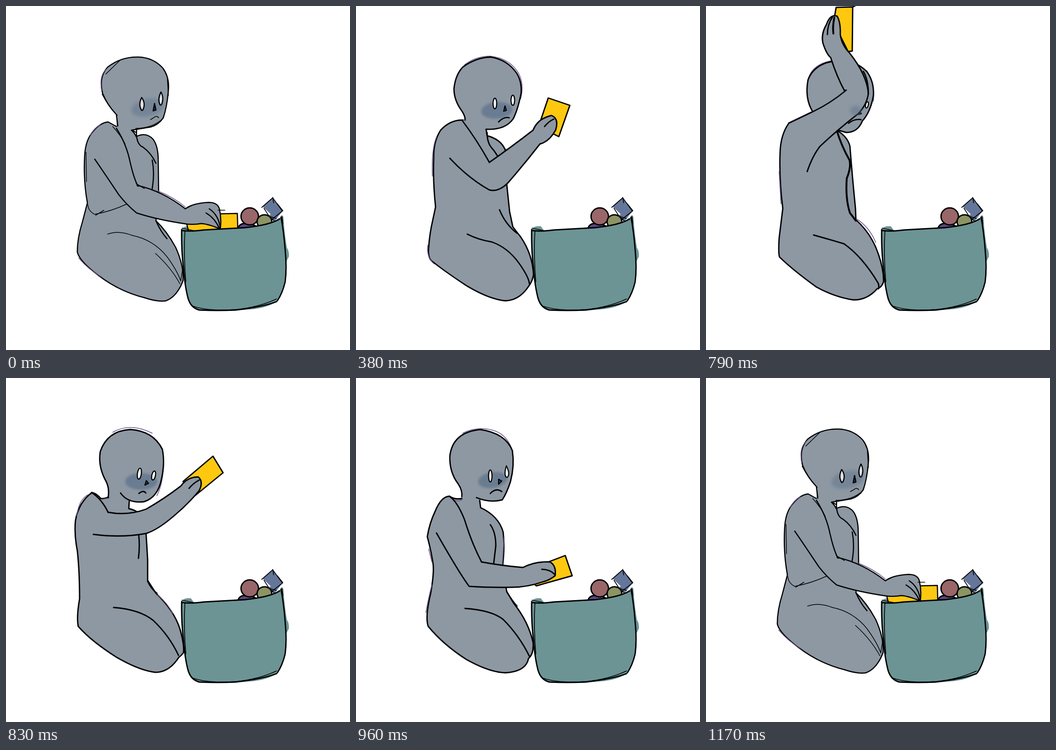
Animation of 748 by 748 pixels, one loop 1540 ms. Source, as an HTML page without scripts:

```html
<!DOCTYPE html>
<html lang="en">
<head>
<meta charset="utf-8">
<title>Toy basket</title>
<style>
html, body { margin: 0; width: 100%; height: 100%; overflow: hidden; background: #fff; }
svg { display: block; width: 100vw; height: 100vh; overflow: hidden; }
path, ellipse { stroke: #000; stroke-width: 2.9; stroke-linecap: round; stroke-linejoin: round; }
.skin, .neck { fill: #8d98a3; }
.neck { stroke: none; }
.line { fill: none; }
.thin { fill: none; stroke-width: 1.7; }
.thick { fill: none; stroke-width: 4; }
.under { fill: none; stroke: #6b5687; stroke-width: 1.6; }
.card { fill: #fec810; }
.eye { fill: #f4f6f7; stroke-width: 2.4; }
.nose { fill: #34404e; stroke-width: 2.2; }
.blush { fill: #5f738b; stroke: none; opacity: .75; filter: blur(2.5px); }
.faint { opacity: .5; filter: blur(3.5px); }
.rough path { stroke-width: 2.5; }
.rough .thin, .rough .under { stroke-width: 1.5; }
.rough .neck { stroke: none; }
.rough .eye { fill: #dde1e5; }
.teal { fill: #6c9495; stroke: none; }
#reel { animation: reel 1540ms step-end infinite; }
/* one cell of the reel per drawing, 1000 units apart */
@keyframes reel {
  0% { transform: translateX(0); }
  18.83% { transform: translateX(-1000px); }
  24.67% { transform: translateX(-2000px); }
  29.87% { transform: translateX(-3000px); }
  35.06% { transform: translateX(-4000px); }
  51.29% { transform: translateX(-5000px); }
  53.89% { transform: translateX(-6000px); }
  57.14% { transform: translateX(-7000px); }
  62.33% { transform: translateX(-8000px); }
  67.53% { transform: translateX(-9000px); }
  70.12% { transform: translateX(-10000px); }
  75.97%, 100% { transform: translateX(0); }
}
</style>
</head>
<body>
<svg viewBox="0 0 748 748">
<defs>
  <g id="rest" class="rough">
    <path class="neck" d="M241 245L276 260L273 271L282 284L240 264Z"/>
    <path class="skin" d="M273 270Q281 278 283 284Q305 273 320 290Q331 305 331 335L332 408L326 467Q350 490 369 525Q387 565 385 597Q372 632 348 641Q330 644 300 634Q245 620 200 585Q160 555 155 535Q155 505 166 470L177 428Q168 380 171 325Q173 290 190 272Q205 254 222 252L240 262"/>
    <path class="skin" d="M243 261L240 236Q220 215 210 190Q201 155 221 133Q250 110 288 111Q320 112 341 135Q356 155 353 185Q350 220 342 243Q332 258 315 263L273 270"/>
    <path class="line" d="M284 270Q282 300 298 307Q316 320 326 342M318 335Q324 365 317 402M326 467Q336 490 350 506M274 270L283 275"/>
    <path class="thin" d="M221 496Q245 487 275 499Q320 508 350 545Q372 575 380 598M178 432Q179 446 193 453Q230 446 264 430M195 455L213 444M325 538Q360 570 378 604M217 148L247 119M209 192Q223 219 242 238M282 266Q318 266 341 245M380 597L386 560M174 318L175 382M351 160L353 195"/>
    <path class="under" d="M208 184Q202 150 219 137M183 281Q191 266 205 258M158 548Q180 574 208 589"/>
    <ellipse class="blush faint" cx="308" cy="221" rx="36" ry="19" transform="rotate(-12 308 221)"/>
    <path class="eye" d="M295 199Q302 208 300 219Q298 228 295 227Q287 215 295 199ZM337 187Q343 198 340 209Q338 217 335 215Q329 203 337 187Z"/>
    <path class="nose" d="M320 228L323 212L326 226Z"/>
    <path class="thin" d="M314 247L321 243Q328 237 332 243"/>
  </g>
  <g id="restArm" class="rough">
    <path class="card" d="M393 474L463 452L503 451L504 484L397 490Z"/>
    <path class="skin" d="M285 390Q340 402 390 441Q405 429 440 427Q460 427 464 441Q469 462 466 485Q440 474 425 473Q405 476 392 474Q330 465 284 450Q262 432 245 410Q215 365 193 333"/>
    <path class="line" d="M240 266Q262 300 270 340Q278 375 287 392M442 441Q463 455 466 484M435 450Q455 462 464 484"/>
    <path class="thin" d="M461 444H476M232 262Q250 282 259 300M283 386L301 397M392 440L408 432"/>
    <path class="under" d="M330 402Q365 416 390 437"/>
  </g>

  <g id="reach">
    <path class="neck" d="M237 244L284 255V275L234 250Z"/>
    <path class="skin" d="M283 268L285 282Q315 290 324 312Q329 335 328 390L334 447L341 480Q350 492 358 502Q384 540 386 585Q383 600 375 610Q355 640 325 641Q290 638 240 608Q190 575 163 553Q156 545 158 525Q160 495 167 465L173 437Q167 380 169 330Q168 295 184 270Q205 247 233 248"/>
    <path class="under" d="M236 128Q260 109 292 109Q335 114 354 147Q366 170 358 202M166 370Q164 310 175 285M156 520Q153 547 170 561M326 310L331 350"/>
    <path class="skin" d="M237 248Q238 240 230 228Q213 205 213 180Q216 150 232 133Q260 112 293 111Q330 117 350 147Q361 165 359 190Q352 225 342 245Q325 270 283 268"/>
    <path class="line" d="M285 275Q285 295 293 306Q310 325 316 345Q317 365 312 385M312 443Q325 475 350 494M242 496Q265 508 295 513Q330 525 355 560Q376 590 377 604"/>
    <ellipse class="blush" cx="306" cy="227" rx="34" ry="18" transform="rotate(-5 306 227)"/>
    <ellipse class="eye" cx="302" cy="212" rx="4" ry="11.5"/>
    <ellipse class="eye" cx="341" cy="205" rx="4" ry="11"/>
    <path class="nose" d="M321 229L324 217L327 227Z"/>
    <path class="line" d="M310 252Q322 240 333 243"/>
  </g>
  <g id="reachArm">
    <path class="card" d="M391 489L395 455L468 444L500 446L503 486Z"/>
    <path class="skin" d="M305 381Q350 392 395 429Q430 420 455 431Q468 440 472 480Q460 476 445 467Q415 465 390 462Q330 443 280 437Q267 432 262 423Q235 375 204 331"/>
    <path class="line" d="M231 249Q256 275 275 315Q290 355 305 381M446 445Q465 460 471 480M428 455Q460 468 471 481"/>
  </g>

  <g id="high">
    <path class="skin" d="M287 275Q305 285 311 310Q314 360 321 450L322 463Q352 495 370 530Q385 565 384 600Q380 606 376 605Q365 640 320 640Q280 637 235 608Q190 570 163 549Q155 540 157 510Q160 470 166 437Q157 380 157 330Q160 285 178 259L231 229"/>
    <path class="under" d="M310 120Q352 130 366 165Q372 210 350 243M155 380Q152 310 168 278M311 306L320 430"/>
    <path class="skin" d="M231 227Q213 190 222 160Q235 130 270 124Q330 115 352 140Q368 160 366 190Q362 225 345 245Q335 275 305 275L290 272"/>
    <path class="line" d="M288 278Q290 300 308 330Q316 345 308 380Q300 410 303 433Q312 455 326 468M228 496Q270 503 305 515Q340 540 375 600"/>
    <path class="thin" d="M235 494Q285 503 318 520Q350 548 372 580M303 435L320 458"/>
    <ellipse class="eye" cx="350" cy="220" rx="4" ry="13" transform="rotate(16 350 220)"/>
    <path class="nose" d="M330 236L335 229L334 238Z"/>
    <path class="line" d="M307 258Q325 252 337 247"/>
  </g>
  <g id="highArm">
    <path class="card" d="M178 -5L228 -5L252 62L239 72L207 40L186 18Z"/>
    <path class="skin" d="M225 360Q228 335 250 305Q300 255 348 208Q348 195 344 168Q340 153 322 138Q285 95 232 71Q230 53 208 40Q209 20 200 16Q190 14 184 18Q168 32 172 65Q178 91 207 96Q228 108 243 128Q268 155 286 181L291 182Q240 225 178 259"/>
    <path class="line" d="M182 22Q175 34 177 49M193 21Q189 34 194 46M206 26L207 42M278 187L291 181"/>
    <path class="thin" d="M225 383Q223 360 232 335M238 308Q254 296 271 288"/>
    <ellipse class="blush faint" cx="328" cy="223" rx="13" ry="12"/>
  </g>

  <g id="over">
    <path class="skin" d="M287 272Q308 285 313 305Q318 370 325 440L326 465Q360 495 375 540Q387 575 386 600Q382 612 372 615Q350 640 320 639Q280 633 240 611Q190 575 160 546Q157 540 159 505L167 440Q159 380 161 320Q162 280 180 255Q190 249 232 231"/>
    <path class="under" d="M220 180Q218 130 272 119M349 140Q368 168 364 207M327 463Q355 480 369 514M179 254L229 230M163 430L159 360"/>
    <path class="skin" d="M232 230Q214 200 222 160Q235 128 272 121Q320 112 350 143Q366 165 364 195Q358 230 340 250Q330 275 305 275L287 270"/>
    <path class="line" d="M234 498Q270 508 300 517Q340 545 374 602Q377 608 375 615"/>
    <path class="thick" d="M285 273Q295 305 312 335Q316 350 306 375Q303 420 313 450L326 467"/>
    <ellipse class="eye" cx="350" cy="215" rx="3" ry="7" transform="rotate(12 350 215)"/>
    <path class="nose" d="M332 236L334 230L338 234Z"/>
    <path class="line" d="M310 255Q322 245 337 247"/>
  </g>
  <g id="overArm">
    <path class="card" d="M280 20L283 3L319 2L318 98L309 99L292 65Z"/>
    <path class="skin" d="M220 360Q232 325 248 305Q285 270 330 235Q350 215 353 190Q350 150 312 102Q295 85 292 62Q293 35 285 22Q270 17 262 40Q250 60 254 80Q262 105 271 112Q285 155 301 184L305 183Q270 212 232 230L180 255"/>
    <path class="line" d="M319 2L324 0M275 24Q264 40 264 62M342 142Q353 160 353 191"/>
    <path class="thick" d="M279 25Q275 45 277 60"/>
    <ellipse class="blush faint" cx="326" cy="228" rx="13" ry="11"/>
  </g>

  <g id="show">
    <path class="neck" d="M223 236L268 255V280L222 260Z"/>
    <path class="skin" d="M268 268L267 284Q295 290 303 315Q306 360 308 395L308 440L326 468Q365 505 378 545Q388 580 386 597Q380 605 376 607Q355 640 325 640Q290 636 240 607Q185 572 157 540Q153 520 160 480Q160 420 155 375Q148 340 151 310Q158 270 187 249Q198 252 206 262Q215 263 224 258"/>
    <path class="under" d="M232 118Q270 96 318 120M343 180Q342 230 328 256M330 472Q352 490 362 512M154 300Q158 265 178 254M209 264L224 261"/>
    <path class="skin" d="M222 260Q226 238 215 220Q200 190 205 160Q220 115 270 112Q320 115 340 155Q346 185 338 220Q330 260 300 269Q265 273 249 250"/>
    <path class="line" d="M272 293Q287 318 289 345Q291 370 288 392M308 442Q315 458 328 468M234 499Q290 503 320 527Q355 560 375 603"/>
    <ellipse class="blush" cx="294" cy="225" rx="35" ry="18"/>
    <ellipse class="eye" cx="290" cy="208" rx="4.3" ry="12" transform="rotate(8 290 208)"/>
    <ellipse class="eye" cx="321" cy="212" rx="4" ry="10" transform="rotate(12 321 212)"/>
    <path class="nose" d="M302 233L305 223L310 229Z"/>
    <path class="line" d="M289 251Q299 243 304 250"/>
  </g>
  <g id="showArm">
    <path class="card" d="M351 376L445 345L457 385L408 412L353 390Z"/>
    <path class="skin" d="M269 394Q310 395 353 390Q375 373 412 373Q424 376 421 385Q412 405 395 420Q350 440 305 443Q265 452 255 452Q235 445 225 425Q195 375 170 339"/>
    <path class="line" d="M186 249Q210 265 225 300Q238 345 269 392M382 388Q400 385 418 376M400 397Q413 389 419 378"/>
    <path class="thin" d="M257 413L267 396"/>
  </g>

  <g id="drop">
    <path class="neck" d="M230 240L269 255V280L229 263Z"/>
    <path class="skin" d="M269 266L271 282Q310 300 320 335Q324 370 318 416L328 465L343 490Q375 530 385 575Q387 600 375 610Q370 638 325 641Q290 640 240 612Q190 580 157 540Q150 520 162 470Q171 420 167 400Q162 370 155 345Q160 315 172 290Q185 258 203 257Q215 265 230 262"/>
    <path class="under" d="M232 120Q265 103 302 115Q330 125 341 160M322 345L318 408M152 510Q158 475 165 450M158 372L165 400M205 260Q220 272 231 264"/>
    <path class="skin" d="M230 258Q232 245 222 230Q203 205 204 170Q210 118 270 112Q325 120 340 158Q345 190 336 225Q328 250 318 265Q290 272 262 260"/>
    <path class="line" d="M292 319Q304 335 304 365L298 415M328 465Q340 485 350 496M237 501Q295 505 320 525Q355 560 377 605"/>
    <ellipse class="blush" cx="297" cy="222" rx="32" ry="17" transform="rotate(-9 297 222)"/>
    <ellipse class="eye" cx="292" cy="213" rx="3.8" ry="13"/>
    <path class="eye" d="M327 191Q333 203 332 210Q330 217 327 216Q321 210 327 191Z"/>
    <path class="nose" d="M310 231V220L317 224Z"/>
    <path class="line" d="M292 251Q305 238 317 247"/>
  </g>
  <g id="dropArm">
    <path class="card" d="M370 473L370 486L475 480L479 429L440 431Z"/>
    <path class="skin" d="M277 407Q320 420 372 433Q405 420 432 428Q448 440 446 478Q435 470 420 467Q395 475 382 470Q310 464 236 454Q215 405 180 335"/>
    <path class="line" d="M203 257Q222 270 243 315Q260 365 277 407L298 414M418 440Q442 455 446 478M410 453Q438 460 444 477M236 453Q253 430 273 408"/>
  </g>
</defs>

<!-- toys and far rim -->
<path d="M504 485Q507 472 521 473Q538 474 545 480Z" fill="#5b4580"/>
<ellipse cx="530" cy="457.5" rx="19" ry="18.5" fill="#99676a"/>
<ellipse cx="562" cy="469" rx="16" ry="15" fill="#8d9464"/>
<path class="teal" d="M558 436L580 417L601 446L584 468L568 456L576 453Z" style="fill:#64779a"/>
<path class="thin" d="M556 438L580 417L601 446L578 464M580 416L582 428M590 430L602 445M568 456L588 462M561 440L572 457L584 468"/>
<path class="teal" d="M381 487Q386 477 402 479L410 490Z"/>

<g id="reel">
  <g><use href="#rest"/><use href="#restArm"/></g>
  <g transform="translate(1000)"><use href="#reach"/><use href="#reachArm"/></g>
  <g transform="translate(2000)">
    <use href="#reach"/>
    <path class="card" d="M397 262L418 200L465 216L441 284Z"/>
    <path class="skin" d="M290 340Q340 305 385 270Q395 245 425 238Q442 245 434 270Q420 295 400 300Q365 345 330 385Q310 405 290 400Q245 375 204 331"/>
    <path class="line" d="M231 249Q262 290 290 340M410 262Q420 250 430 246"/>
  </g>
  <g transform="translate(3000)">
    <use href="#high"/>
    <path class="card" d="M305 10L345 8L352 95L338 108L308 60Z"/>
    <path class="skin" d="M225 350Q260 310 325 278Q362 255 360 225Q358 170 335 110Q338 80 325 62Q305 58 298 80Q296 105 303 120Q312 160 312 195Q270 225 178 259"/>
    <path class="line" d="M312 66Q306 78 308 92M320 66Q318 78 320 90"/>
  </g>
  <g transform="translate(4000)"><use href="#high"/><use href="#highArm"/></g>
  <g transform="translate(5000)"><use href="#over"/><use href="#overArm"/></g>
  <g transform="translate(6000)">
    <use href="#show"/>
    <path class="card" d="M385 225L450 170L472 206L412 255Z"/>
    <path class="skin" d="M222 292Q265 300 305 285Q345 262 380 235Q395 215 418 215Q430 225 420 245Q395 275 365 300Q330 330 305 338Q250 348 190 340"/>
    <path class="line" d="M186 249Q208 263 222 292M398 240Q408 228 420 222"/>
  </g>
  <g transform="translate(7000)"><use href="#show"/><use href="#showArm"/></g>
  <g transform="translate(8000)">
    <use href="#drop"/>
    <path class="card" d="M360 422L455 386L470 430L392 452Z"/>
    <path class="skin" d="M273 400Q315 408 363 412Q390 398 422 400Q436 408 433 430Q420 440 407 443Q372 455 340 455Q290 456 246 453Q225 425 175 337"/>
    <path class="line" d="M203 257Q220 268 236 308Q252 360 273 400M404 416Q422 416 433 428"/>
  </g>
  <g transform="translate(9000)"><use href="#drop"/><use href="#dropArm"/></g>
  <g transform="translate(10008 2)"><use href="#drop"/><use href="#dropArm"/></g>
</g>

<!-- basket -->
<path class="teal" d="M381 487Q400 491 430 487L520 482Q575 476 594 461L603 457Q606 500 611 526Q616 533 615 545L610 555Q612 610 592 640Q575 654 540 659L490 663H430Q402 662 397 640Q388 600 386 570Q382 520 381 487Z"/>
<path class="line" d="M382 486Q381 530 386 570Q389 610 396 636Q402 656 420 661Q460 663 500 661Q560 654 588 643M598 459Q604 490 607 530Q611 570 607 600Q601 625 590 641M382 488Q400 491 430 487L520 482Q575 476 595 463"/>
<path class="thin" d="M408 653Q440 664 500 660Q550 655 588 637M389 490Q386 540 391 600M383 483L411 489M600 456L602 474"/>
</svg>
</body>
</html>
```
